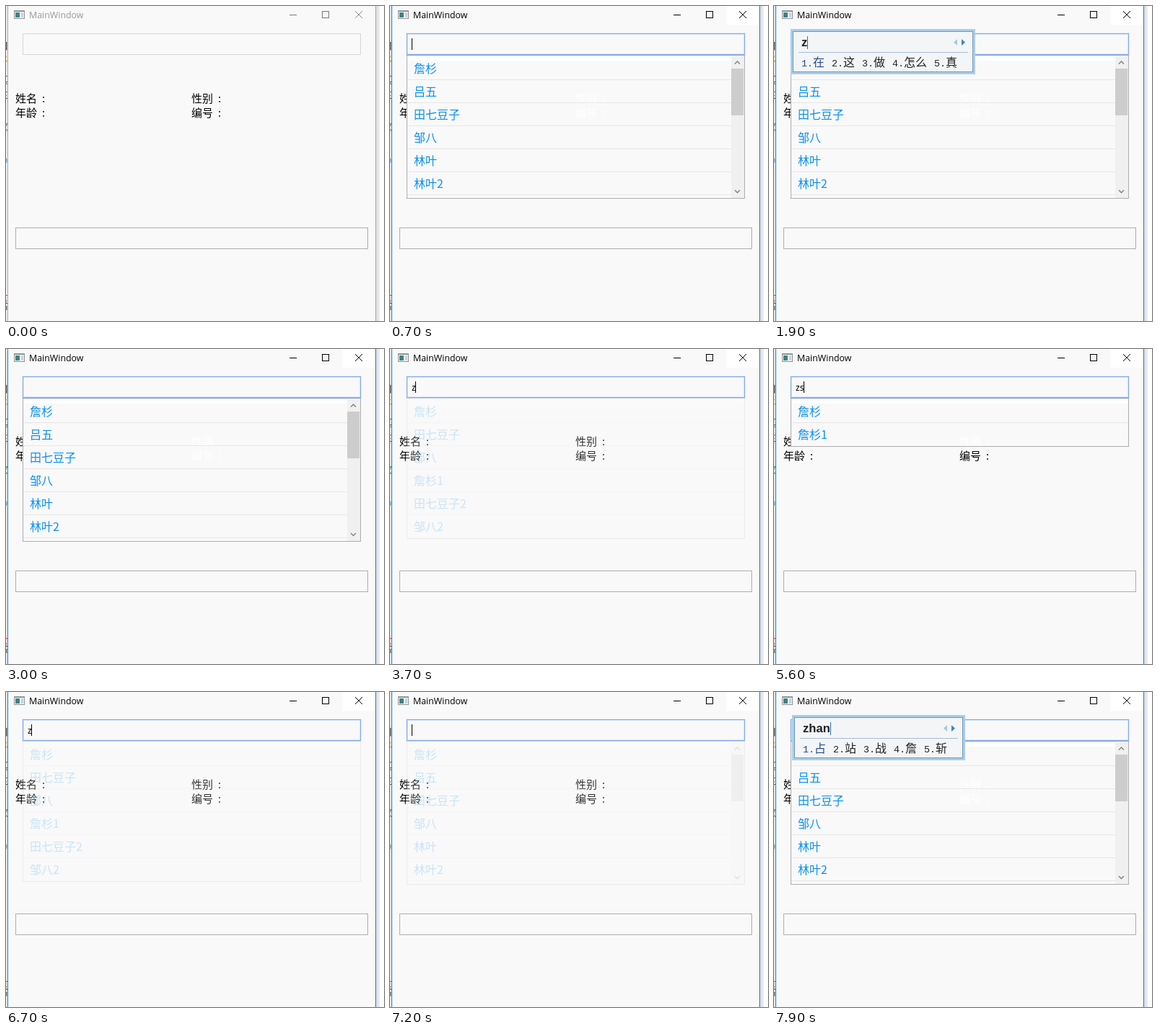
Write an HTML page with a canvas that moves like this. It is 524 px wide and 438 px high and loops after 8 s.

```html
<!DOCTYPE html>
<html lang="zh-CN">
<head>
<meta charset="utf-8">
<title>MainWindow</title>
<style>
html, body { margin: 0; width: 100%; height: 100%; overflow: hidden; background: #fff; }
canvas { display: block; }
</style>
</head>
<body>
<canvas id="stage" width="524" height="438"></canvas>
<script>
const ctx = document.getElementById('stage').getContext('2d');
const LOOP = 8000;
const CJK = '"Noto Sans CJK SC", "Noto Sans CJK", sans-serif';
const BG = '#f9f9f9';

const LISTS = {
  all: { rows: ['詹杉', '吕五', '田七豆子', '邹八', '林叶', '林叶2'], bottom: 267, scroll: true },
  z: { rows: ['詹杉', '田七豆子', '邹八', '詹杉1', '田七豆子2', '邹八2'], bottom: 263 },
  zs: { rows: ['詹杉', '詹杉1'], bottom: 135 }
};

// [start ms, value]
const LIST_STEPS = [[0, null], [600, 'all'], [3700, 'z'], [4800, 'zs'], [6700, 'z'], [7200, 'all']];
const TEXT_STEPS = [[0, ''], [3500, 'z'], [4700, 'zs'], [6600, 'z'], [7100, '']];
const CARET_STEPS = [[0, false], [500, true], [1100, false], [1500, true], [1900, false],
  [3400, true], [4000, false], [4500, true], [5200, false], [5600, true], [6100, false],
  [6600, true], [7600, false]];
const IME_STEPS = [[0, ''], [1900, 'z'], [3000, ''], [7600, 'z'], [7700, 'zh'], [7800, 'zha'], [7900, 'zhan']];
const CANDIDATES = {
  z: ['在', '这', '做', '怎么', '真'],
  zh: ['这', '中', '着', '只', '真'],
  zha: ['炸', '扎', '渣', '眨', '闸'],
  zhan: ['占', '站', '战', '詹', '斩']
};
const CARET_X = [30, 35, 41];

function current(steps, t) {
  return steps.filter(s => s[0] <= t).pop();
}

function rect(x, y, w, h, color) {
  ctx.fillStyle = color;
  ctx.fillRect(x, y, w, h);
}

function frame(x, y, w, h, color) {
  ctx.strokeStyle = color;
  ctx.lineWidth = 1;
  ctx.strokeRect(x + 0.5, y + 0.5, w - 1, h - 1);
}

function text(str, x, y, font, color) {
  ctx.font = font;
  ctx.fillStyle = color;
  ctx.fillText(str, x, y);
}

function path(points, color, fill) {
  ctx.beginPath();
  points.forEach(([x, y], i) => i ? ctx.lineTo(x, y) : ctx.moveTo(x, y));
  if (fill) {
    ctx.fillStyle = color;
    ctx.fill();
  } else {
    ctx.strokeStyle = color;
    ctx.stroke();
  }
}

function drawBackdrop(active) {
  rect(0, 0, 524, 438, '#fdfdfd');
  const shade = ctx.createLinearGradient(513, 0, 518, 0);
  shade.addColorStop(0, active ? '#d8dade' : '#dcdcdc');
  shade.addColorStop(1, '#efefef');
  rect(513, 0, 5, 438, shade);

  // slivers of the window behind
  rect(0, 0, 2, 438, active ? '#e4e7ea' : '#ececec');
  ctx.save();
  ctx.beginPath();
  ctx.rect(0, 0, 2, 438);
  ctx.clip();
  const bits = [['口', 60, '#333'], ['子', 81, '#c80'], ['其', 107, '#555'], ['主', 128, '#555'],
    ['次', 172, '#487'], ['@', 220, '#37a'], ['言', 412, '#b33'], ['后', 421, '#555']];
  bits.forEach(([s, y, c]) => text(s, -11, y, '14px ' + CJK, c));
  ctx.restore();

  const edge = active ? '#1883d7' : '#aaaaaa';
  rect(2, 0, 511, 438, BG);
  rect(2, 0, 1, 438, edge);
  rect(512, 0, 1, 438, edge);
}

function drawTitle(active, t) {
  rect(11, 6, 15, 12, '#8d9499');
  rect(12, 8, 13, 9, '#f4f6f8');
  rect(13, 9, 6, 7, '#3f8383');
  rect(21, 9, 3, 7, '#c9d2d8');
  text('MainWindow', 32, 17, '12.4px "Open Sans", sans-serif', active ? '#000' : '#999');

  const ink = active ? '#000' : '#777';
  rect(393, 12, 10, 1, ink);
  frame(438, 7, 10, 10, ink);
  if (active) rect(467, 0, 45, 26, '#fff');
  const cross = active ? '#000' : t < 100 ? '#888' : '#777';
  ctx.lineWidth = 1;
  path([[484, 7], [494, 17]], cross);
  path([[494, 7], [484, 17]], cross);
}

function drawLabels(color) {
  const label = (s, x, y) => {
    text(s, x, y, '15px ' + CJK, color);
    text(':', x + 37, y, '15px "Noto Sans", sans-serif', color);
  };
  label('姓名', 13, 134);
  label('年龄', 13, 154);
  label('性别', 257, 134);
  label('编号', 257, 154);
}

function drawInput(active, value, caret) {
  rect(23, 38, 469, 30, BG);
  if (active) {
    frame(22, 37, 471, 32, '#e3ebfb');
    frame(24, 39, 467, 28, '#dce6fa');
  }
  frame(23, 38, 469, 30, active ? '#86a9ea' : '#d5d5d5');
  text(value, 30, 58, '12px "Noto Sans", sans-serif', '#000');
  if (caret) rect(CARET_X[value.length], 45, 1, 16, '#000');
}

function drawScrollbar() {
  rect(473, 70, 18, 197, '#f0f0f0');
  rect(473, 87, 17, 65, '#cdcdcd');
  ctx.lineWidth = 1.4;
  path([[478, 80.5], [481.5, 77], [485, 80.5]], '#808080');
  path([[478, 256], [481.5, 259.5], [485, 256]], '#808080');
}

function drawList({ rows, bottom, scroll }, alpha) {
  ctx.save();
  ctx.globalAlpha = alpha;
  rect(23, 68, 469, bottom - 67, BG);
  const right = scroll ? 473 : 491;
  rect(24, 70, right - 24, 6, '#fff');
  // labels shine through in white
  if (alpha === 1) {
    ctx.save();
    ctx.beginPath();
    ctx.rect(200, 69, 200, bottom - 69);
    ctx.clip();
    drawLabels('#fff');
    ctx.restore();
  }
  rows.forEach((name, i) => {
    const y = 102 + i * 32;
    text(name, 33, y - 9, '16px ' + CJK, '#0a8ff2');
    if (y < bottom - 1) rect(24, y, right - 24, 1, '#e6e6e6');
  });
  if (scroll) drawScrollbar();
  frame(23, 68, 469, bottom - 67, '#adadad');
  rect(23, 68, 469, 1, '#86a9ea');
  ctx.restore();
}

function drawIme(typed, x) {
  const words = CANDIDATES[typed];
  const w = 224 + words.join('').length * 16 - 64;
  rect(x, 32, w, 63, '#a9cdea');
  rect(x + 3, 35, w - 6, 57, '#f3f5f7');
  frame(x + 3, 35, w - 6, 57, '#7598b8');

  const font = 'bold 16.6px "Liberation Sans", sans-serif';
  text(typed, x + 15, 56, font, '#222');
  rect(Math.round(x + 15 + ctx.measureText(typed).width), 42, 1, 18, '#2f6fb0');

  const r = x + w;
  path([[r - 25, 46], [r - 25, 55], [r - 30, 50.5]], '#a9c9dd', true);
  path([[r - 19, 46], [r - 19, 55], [r - 14, 50.5]], '#3f86b8', true);
  rect(x + 11, 64, w - 21, 1, '#a5bcd3');

  let cx = x + 15;
  words.forEach((word, i) => {
    const color = i ? '#222' : '#24488f';
    text(i + 1 + '.', cx, 84, '13.4px "Liberation Mono", monospace', color);
    text(word, cx + 16, 84, '300 16px ' + CJK, color);
    cx += 26 + word.length * 16;
  });
}

function draw(t) {
  const active = t >= 500;
  const [listStart, listName] = current(LIST_STEPS, t);
  const typed = current(IME_STEPS, t)[1];

  drawBackdrop(active);
  drawTitle(active, t);
  drawLabels('#000');
  frame(13, 308, 489, 30, '#adadad');
  drawInput(active, current(TEXT_STEPS, t)[1], current(CARET_STEPS, t)[1]);
  if (listName) drawList(LISTS[listName], t - listStart < 100 ? 0.2 : 1);
  if (typed) drawIme(typed, t < 3000 ? 23 : 25);
}

function tick() {
  draw(performance.now() % LOOP);
  requestAnimationFrame(tick);
}
tick();
</script>
</body>
</html>
```
